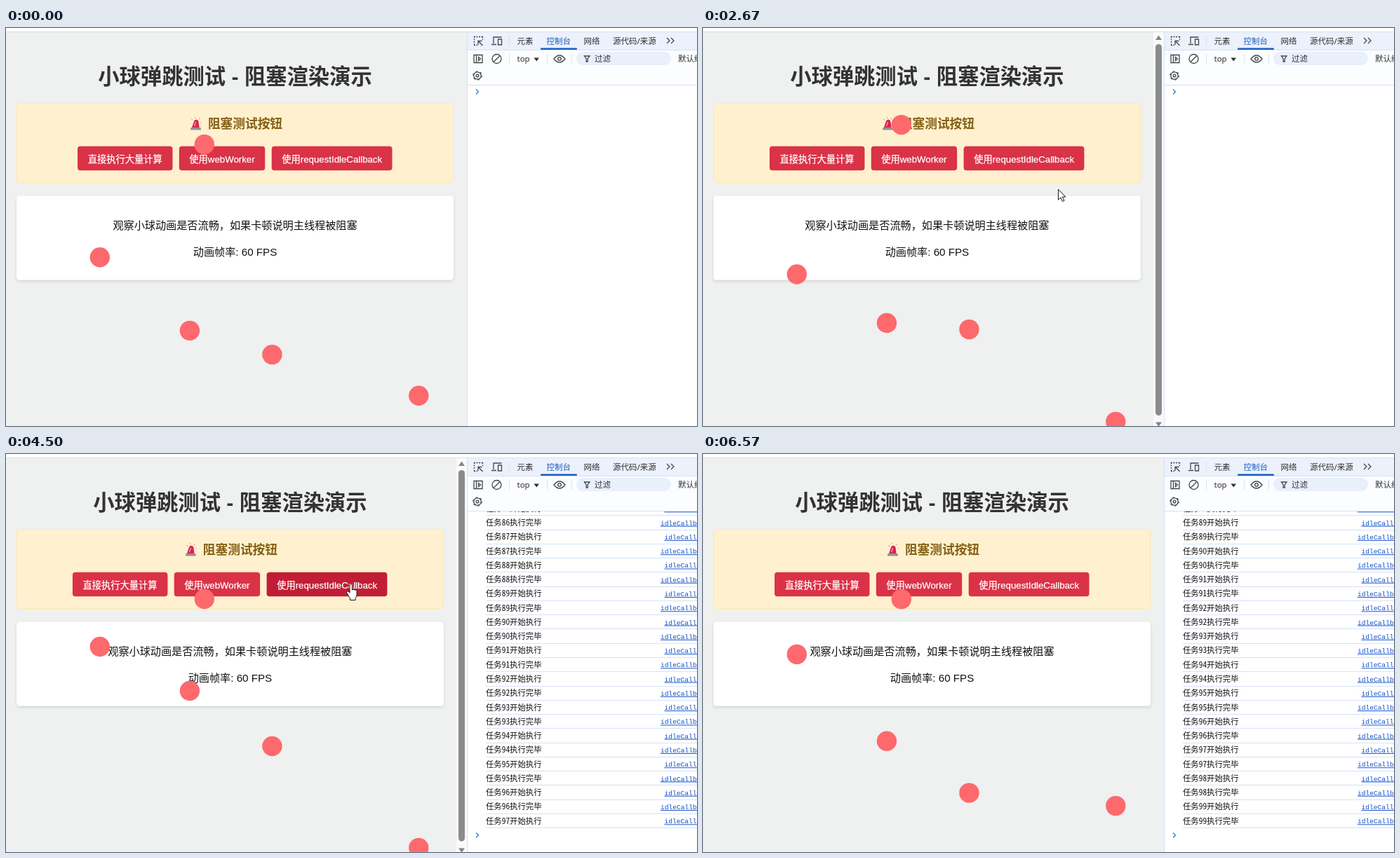
Recreate the animation shown at these times as an HTML page. Size 985 px wide and 568 px high, loop 6.6 s.

```html
<!DOCTYPE html>
<html lang="zh-CN">
<head>
<meta charset="utf-8">
<title>小球弹跳测试</title>
<style>
html, body { margin: 0; width: 100%; height: 100%; overflow: hidden; background: #fff }
svg { display: block; width: 985px; height: 568px }
text { white-space: pre }
.page { font-family: "Liberation Sans", Arial, "Noto Sans CJK SC", sans-serif; text-anchor: middle }
.tools { font: 11.5px "Noto Sans", "Noto Sans CJK SC", sans-serif; fill: #303134 }
.log { font: 11.36px "Noto Sans Mono CJK SC", "Noto Sans CJK SC", monospace; fill: #111 }
.log a { font: 9.6px "Liberation Mono", monospace; fill: #1150c8; text-decoration: underline; text-underline-offset: 1px }
.icon { fill: none; stroke: #44474b; stroke-width: 1.3 }
.label { font-size: 13.26px; fill: #fff; stroke: #fff; stroke-width: .25 }
.balls { fill: #fd696d }
</style>
</head>
<body>
<svg viewBox="0 0 985 568">
  <defs>
    <clipPath id="pageClip"><rect y="6" width="657" height="562"/></clipPath>
    <clipPath id="logClip"><rect x="658" y="82" width="327" height="486"/></clipPath>
    <filter id="shadow" x="-5%" y="-10%" width="110%" height="125%">
      <feDropShadow dx="0" dy="2" stdDeviation="2" flood-opacity=".12"/>
    </filter>
  </defs>

  <g class="page" clip-path="url(#pageClip)">
    <rect y="5" width="657" height="563" fill="#eff0f0"/>
    <rect class="card" x="15.5" y="107.5" width="622" height="113" rx="4.5" fill="#fff1cf" stroke="#ffe9a9"/>
    <rect class="card" x="15" y="239.5" width="623" height="120" rx="4.5" fill="#fff" filter="url(#shadow)"/>
    <g id="content">
      <text x="326.5" y="80" font-size="30.3" font-weight="700" fill="#333">小球弹跳测试 - 阻塞渲染演示</text>
      <g>
        <path d="M265 142l3-9q1.500-3 4-2.200 2.500.7 2.700 3.700l.8 7.500z" fill="#d8284f"/>
        <path d="M268.500 140l2-6" stroke="#f58ba0" stroke-width="1.500"/>
        <path d="M263.500 142h14l.5 3.500h-15z" fill="#9a8d98"/>
        <path d="M269.500 127l.5 2M264.500 130l1.500 1.500M276.500 128.500l-1.500 1.500M277.500 134.500h1.500" stroke="#f0959c" stroke-width="1.100"/>
      </g>
      <text x="341" y="143" font-size="17.7" font-weight="700" fill="#856013">阻塞测试按钮</text>
      <g fill="#da3247">
        <rect x="102" y="168.700" width="135.500" height="34.500" rx="4"/>
        <rect x="246.800" y="168.700" width="122.400" height="34.500" rx="4"/>
        <rect id="idle" x="378.700" y="168.700" width="171.800" height="34.500" rx="4"/>
      </g>
      <g class="label">
        <text x="169.700" y="191.500">直接执行大量计算</text>
        <text x="308" y="191.500">使用webWorker</text>
        <text x="464.700" y="191.500">使用requestIdleCallback</text>
      </g>
      <g font-size="15.15" fill="#111">
        <text x="326.500" y="287.300">观察小球动画是否流畅，如果卡顿说明主线程被阻塞</text>
        <text x="326.500" y="325.300">动画帧率: 60 FPS</text>
      </g>
    </g>
    <g class="balls" id="balls"></g>
    <g id="bar">
      <rect x="642" y="6" width="15" height="562" fill="#fafafa"/>
      <path d="M645 17l4.500-6.500 4.500 6.500zM645 562.500l4.500 6.500 4.500-6.500z" fill="#858585"/>
      <rect id="thumb" x="645" y="23" width="9" rx="4.500" fill="#8b8b8b"/>
    </g>
  </g>
  <path d="M0 5.500h657" stroke="#dcdfe3"/>

  <g class="tools">
    <rect x="657" y="5" width="328" height="26" fill="#ecf1fb"/>
    <rect x="657" y="31" width="328" height="50" fill="#fcfdff"/>
    <path d="M657.500 5v563M657 5.500h328M657 31.500h328M657 81.500h328M717.500 11v14M717.500 37v14M771.500 37v14M806.500 37v14" fill="none" stroke="#d5e2f7"/>
    <rect x="762" y="28.500" width="52" height="2.500" rx="1" fill="#1a5fc4"/>
    <rect x="813" y="34" width="135" height="19" rx="9.500" fill="#e9effb"/>
    <text x="728.500" y="22.500">元素</text>
    <text x="770.500" y="22.500" fill="#1a5fc4">控制台</text>
    <text x="823.500" y="22.500">网络</text>
    <text x="865" y="22.500">源代码/来源</text>
    <text x="728.500" y="48">top</text>
    <text x="839" y="48.300">过滤</text>
    <text x="958" y="48.300">默认级别</text>
    <path d="M752.500 42.500h7.500l-3.750 5z"/>
    <g class="icon">
      <path d="M667 12.500h12.500M667.500 12v12.500M667 24.500h5M679.500 12v5" stroke-dasharray="2 1.500"/>
      <path d="M679.500 25l-6-6M673 24v-5.500h5.500"/>
      <path d="M695 22v-9h11.500M692 23.500h7M701.500 16h5v8h-5z"/>
      <path d="M942 14l4 4-4 4M948 14l4 4-4 4"/>
      <path d="M667 38.500h12v11h-12zM670.500 38v12M673.500 41.500l3 2.500-3 2.500z"/>
      <circle cx="699.500" cy="44" r="6.500"/><path d="M704 39.500l-9 9"/>
      <path d="M781 44q8-10 16 0-8 10-16 0z"/><circle cx="789" cy="44" r="2.300"/>
      <path d="M824.500 40h7.500l-2.800 4v4h-2v-4z"/>
      <circle cx="672" cy="68" r="5.200"/><circle cx="672" cy="68" r="1.900"/>
      <circle cx="672" cy="68" r="6.200" stroke-dasharray="2.600 3.890"/>
    </g>
  </g>

  <g class="log" clip-path="url(#logClip)">
    <g id="rows"></g>
    <path id="prompt" d="M670 -3.500l3.500 3.500-3.500 3.500" fill="none" stroke="#2f80d8" stroke-width="1.300"/>
  </g>

  <circle id="click" cx="490" cy="186" r="12" fill="#eda01c" opacity=".8"/>
  <g id="cursor" fill="#fff" stroke="#111" stroke-linejoin="round">
    <path id="arrow" d="M.5.5v15l3.500-3.300 2.500 5.600 2.500-1.100-2.500-5.400h4.500z"/>
    <path id="hand" d="M-2 11V1.500q0-2 1.700-2t1.700 2V8q1-1.300 2.500-.3 1.300-.7 2.200.6 1.700-.4 2 1.300v5q0 3-2 5v2.900h-7.500v-2.400q-2-2.300-3.200-5.100l-1.900-3.300q-.4-1.800 1.400-1.900 1.300.2 3.100 2.200z"/>
  </g>
</svg>
<script>
const LOOP = 6600, AMP = 47.35, ROW = 20.27, BAR = 14.2;
const $ = id => document.getElementById(id);
const show = (el, on) => el.style.display = on ? '' : 'none';

// [x, middle y]; each ball runs one radian ahead of the previous one
const balls = [[282.8, 181], [379.4, 436.3], [261.9, 384.8], [133.8, 306.2], [588.3, 549.1]];
// [time, phase]
const phases = [[0, -.321], [1070, 1.847], [2670, 5.15], [3410, 6.677], [4500, 8.843], [5620, 11.171], [6600, 13.212]];
// [time, x, y]
const path = [[150, 911, 568], [670, 686, 310], [1500, 686, 310], [2050, 530, 262], [2450, 530, 262],
  [2670, 506, 230], [2850, 492, 186], [4950, 492, 186], [5450, 920, 568]];

function track(keys, t) {
  const i = Math.max(1, keys.findIndex(k => k[0] >= t));
  const a = keys[i - 1], b = keys[i], f = (t - a[0]) / (b[0] - a[0]);
  return a.slice(1).map((v, j) => v + (b[j + 1] - v) * f);
}

const dots = balls.map(([x]) => {
  const dot = document.createElementNS('http://www.w3.org/2000/svg', 'circle');
  dot.setAttribute('cx', x);
  dot.setAttribute('r', 14.2);
  return $('balls').appendChild(dot);
});

function drawPage(t) {
  const [phase] = track(phases, t);
  const ys = balls.map(([, mid], i) => mid + AMP * Math.sin(phase + i));
  dots.forEach((dot, i) => dot.setAttribute('cy', ys[i]));
  // the lowest ball overflows the page and brings up the scrollbar
  const over = ys[4] - 554.4, barOn = over > 0;
  show($('bar'), barOn);
  $('thumb').setAttribute('height', 537 * 563 / (563 + Math.max(0, over)));
  $('content').setAttribute('transform', `translate(${barOn ? -BAR / 2 : 0})`);
  document.querySelectorAll('.card').forEach((card, i) =>
    card.setAttribute('width', 622 + i - (barOn ? BAR : 0)));
}

let shown = -1;
function drawLog(t) {
  const n = Math.max(0, Math.min(200, Math.floor((t - 3435) * .1835)));
  if (n === shown) return;
  shown = n;
  const end = Math.min(91 + ROW * n, 544);
  let out = '';
  for (let k = Math.max(0, n - 24); k < n; k++) {
    const y = end - ROW * (n - k), done = k % 2;
    out += `<text x="684" y="${y + 4}">任务${k >> 1}${done ? '执行完毕' : '开始执行'}</text>
      <a><text x="${done ? 933 : 938.5}" y="${y + 3.6}">idleCallback</text></a>
      <path d="M684 ${Math.round(y + 9.5) + .5}h301" stroke="#d5e2f7"/>`;
  }
  $('rows').innerHTML = out;
  $('prompt').setAttribute('transform', `translate(0 ${end})`);
}

function drawCursor(t) {
  const on = t >= 150 && t < 5450;
  show($('cursor'), on);
  show($('click'), t >= 3360 && t < 3480);
  const [x, y] = on ? track(path, t) : [0, 0];
  const hover = x > 379 && x < 550 && y > 169 && y < 203;
  $('cursor').setAttribute('transform', `translate(${x} ${y})`);
  show($('arrow'), !hover);
  show($('hand'), hover);
  $('idle').setAttribute('fill', hover ? '#c21d36' : '#da3247');
}

function frame() {
  const t = performance.now() % LOOP;
  drawPage(t);
  drawLog(t);
  drawCursor(t);
  requestAnimationFrame(frame);
}
frame();
</script>
</body>
</html>
```
